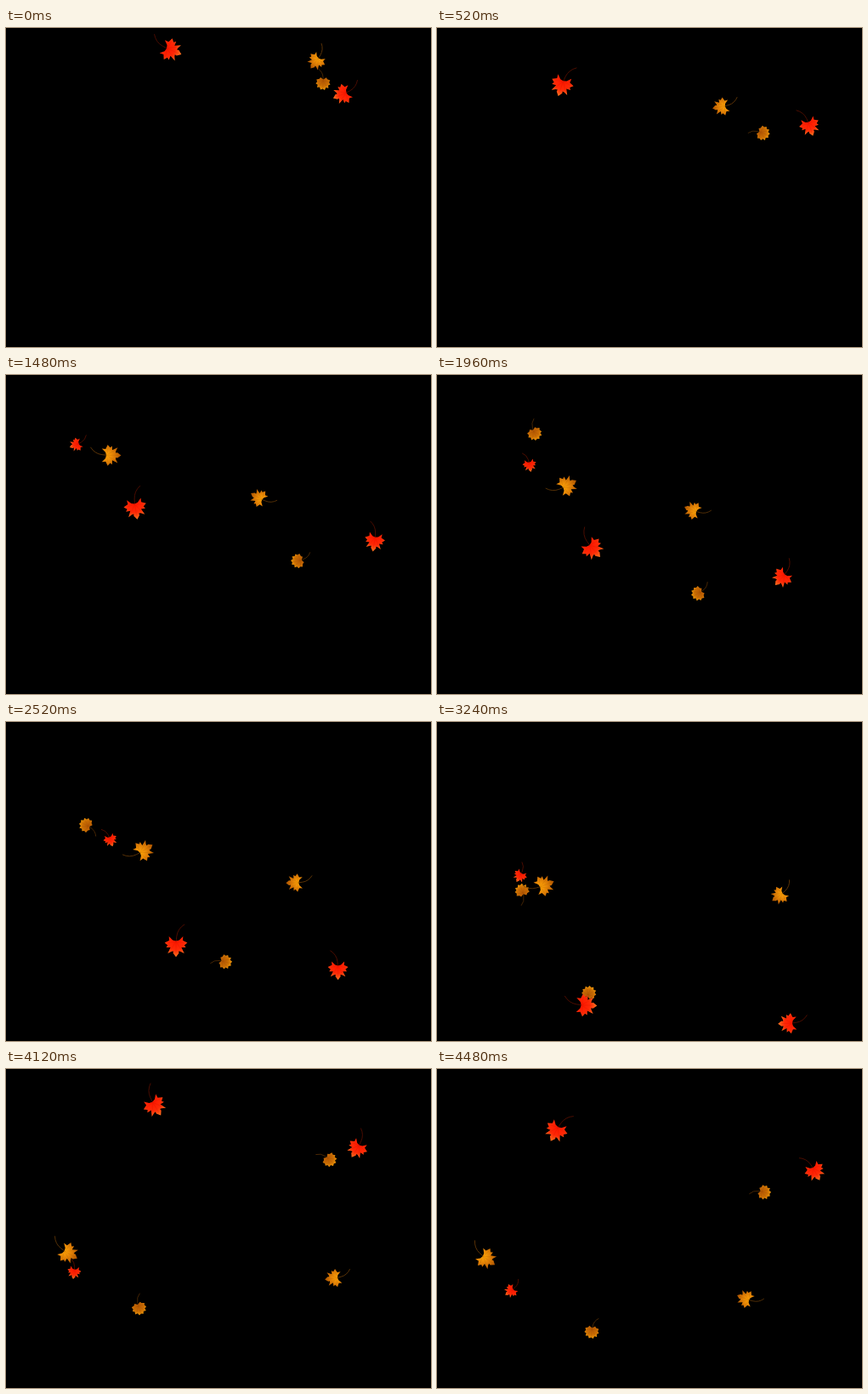
An HTML page with a canvas for the animation above (4.56 s loop, 500 by 375 pixels).

```html
<!DOCTYPE html>
<html>
<head>
<meta charset="utf-8">
<title>Falling leaves</title>
<style>
  html, body { margin: 0; width: 100%; height: 100%; overflow: hidden; background: #000; }
  canvas { display: block; }
</style>
</head>
<body>
<canvas id="stage" width="500" height="375"></canvas>
<script>
const ctx = document.getElementById('stage').getContext('2d');
const LOOP = 4560, STEP = 40, LAST = 4480;

// Right half of each outline, from the stem joint (top) to the main tip (bottom).
const MAPLE = [[0, -.42], [.3, -.5], [.65, -.86], [.62, -.48], [1.04, -.28], [.76, -.04],
  [.9, .16], [.5, .16], [.76, .7], [.4, .52], [.24, .5], [.27, .68], [0, 1.04]];
const ROUND = [[0, -.55], [.4, -.82], [.56, -.6], [.95, -.48], [.84, -.18], [1.02, .1],
  [.74, .26], [.8, .62], [.44, .58], [.3, .92], [0, .78]];

function outline(half) {
  const path = new Path2D();
  const rest = half.slice(1, -1).reverse().map(([x, y]) => [-x, y]);
  [...half, ...rest].forEach(([x, y]) => path.lineTo(x, y));
  path.closePath();
  return path;
}

function shade(...colors) {
  const g = ctx.createRadialGradient(0, -.4, .1, 0, -.4, 1.45);
  colors.forEach((c, i) => g.addColorStop(i / (colors.length - 1), c));
  return g;
}

const maple = outline(MAPLE);
const RED = { shape: maple, fill: shade('#ff1800', '#ff2806', '#ff7a22'), stem: '#5c1000', vein: '#c01800' };
const GOLD = { shape: maple, fill: shade('#ffa208', '#dc7c06', '#a85000'), stem: '#6a3c08', vein: '#a45a00' };
const SMALL = { shape: outline(ROUND), fill: shade('#b65a04', '#c86c04', '#f6a00a'), stem: '#583006', vein: '#9a4c00' };

const veins = new Path2D('M0-.4L0 .75M0-.4L.5.4M0-.4L-.5.4M0-.4L.7-.25M0-.4L-.7-.25');
const stem = new Path2D('M.14-.38L.26-.8Q.45-1.5 0-2.12');

// Keys: [time, x, y, angle of the stem tip from vertical]
const SWING = [[0, 0, 0, 46], [480, 42, 38, -32], [580, 54, 47, -50], [1040, 64, 90, -41],
  [1760, 24, 157, 8], [1960, 11, 178, 20], [2280, -4, 210, 5], [2520, -6, 237, -22],
  [3000, 7, 284, 32], [3240, 19, 307, 66], [3500, 45, 335, 80], [3740, 70, 370, 82]];
const SWEEP = [[0, 365, 39, 16], [180, 356, 65, 35], [1040, 305, 128, 88], [1600, 297, 148, 98],
  [1960, 301, 159, 90], [2520, 340, 189, 67], [3240, 403, 204, 32], [3760, 404, 224, 35], [4480, 363, 270, 90]];
const GLIDE = [[860, 72, 25, 16], [1040, 67, 55, 35], [1960, 7, 130, 97], [2520, -2, 151, 101],
  [3240, 34, 192, 90], [3760, 70, 209, 48], [4480, 102, 223, 32]];
const DRIFT = [[-200, 365, 25, -10], [0, 373, 65, -18], [720, 385, 145, -96], [1040, 373, 179, 27],
  [1960, 307, 257, 39], [2520, 258, 282, -96], [3240, 179, 318, -180], [3560, 142, 340, -200]];
const SPIN = [[1880, -4, 62, 20], [1960, 0, 69, 3], [2520, 21, 121, -139],
  [3240, 15, 198, -183], [3760, -17, 252, -323], [4480, -67, 309, -388]];

// A negative scale mirrors both the path and the leaf.
const leaves = [
  { keys: DRIFT, look: SMALL, r: 8.4, x: 0, y: 0, scale: 1, starts: [0, 3760] },
  { keys: SWEEP, look: GOLD, r: 10.3, x: 0, y: 0, scale: 1, starts: [0] },
  { keys: SPIN, look: SMALL, r: 8.4, x: 115, y: 0, scale: -1, starts: [0] },
  { keys: SWING, look: RED, r: 7.8, x: 82.5, y: 82, scale: .63, starts: [1480] },
  { keys: GLIDE, look: GOLD, r: 12, x: 160, y: 0, scale: -1, starts: [0] },
  { keys: SWING, look: RED, r: 12.8, x: 194, y: 26, scale: -1, starts: [0, 3900] },
  { keys: SWING, look: RED, r: 11.5, x: 396, y: 78, scale: .9, starts: [0, 3900] }
];

// Smooth curve through the keys; null outside their time span.
function pose(keys, t) {
  const n = keys.length - 1;
  if (t < keys[0][0] || t > keys[n][0]) return null;
  let i = 0;
  while (i < n - 1 && t >= keys[i + 1][0]) i++;
  const a = keys[i], b = keys[i + 1], span = b[0] - a[0], u = (t - a[0]) / span;
  const slope = (j, c) => {
    const p = keys[Math.max(j - 1, 0)], q = keys[Math.min(j + 1, n)];
    return (q[c] - p[c]) / (q[0] - p[0]) * span;
  };
  return [1, 2, 3].map(c => {
    const d = b[c] - a[c], m0 = slope(i, c), m1 = slope(i + 1, c);
    return a[c] + u * (m0 + u * (3 * d - 2 * m0 - m1 + u * (m0 + m1 - 2 * d)));
  });
}

function drawLeaf({ keys, look, r, x, y, scale }, t) {
  const p = pose(keys, t);
  if (!p) return;
  ctx.save();
  ctx.translate(x + scale * p[0], y + Math.abs(scale) * p[1]);
  ctx.scale(Math.sign(scale) * r, r);
  ctx.rotate(p[2] * Math.PI / 180);
  ctx.lineWidth = .75 / r;
  ctx.strokeStyle = look.stem;
  ctx.stroke(stem);
  ctx.rotate(22 * Math.PI / 180);
  ctx.fillStyle = look.fill;
  ctx.fill(look.shape);
  ctx.globalAlpha = .4;
  ctx.lineWidth = .5 / r;
  ctx.strokeStyle = look.vein;
  ctx.stroke(veins);
  ctx.restore();
}

function draw(now) {
  const t = Math.min(Math.floor(now % LOOP / STEP) * STEP, LAST);
  ctx.fillStyle = '#000';
  ctx.fillRect(0, 0, 500, 375);
  for (const leaf of leaves)
    for (const start of leaf.starts) drawLeaf(leaf, t - start);
}

const begin = performance.now();
function tick() {
  draw(performance.now() - begin);
  requestAnimationFrame(tick);
}
tick();
</script>
</body>
</html>
```
